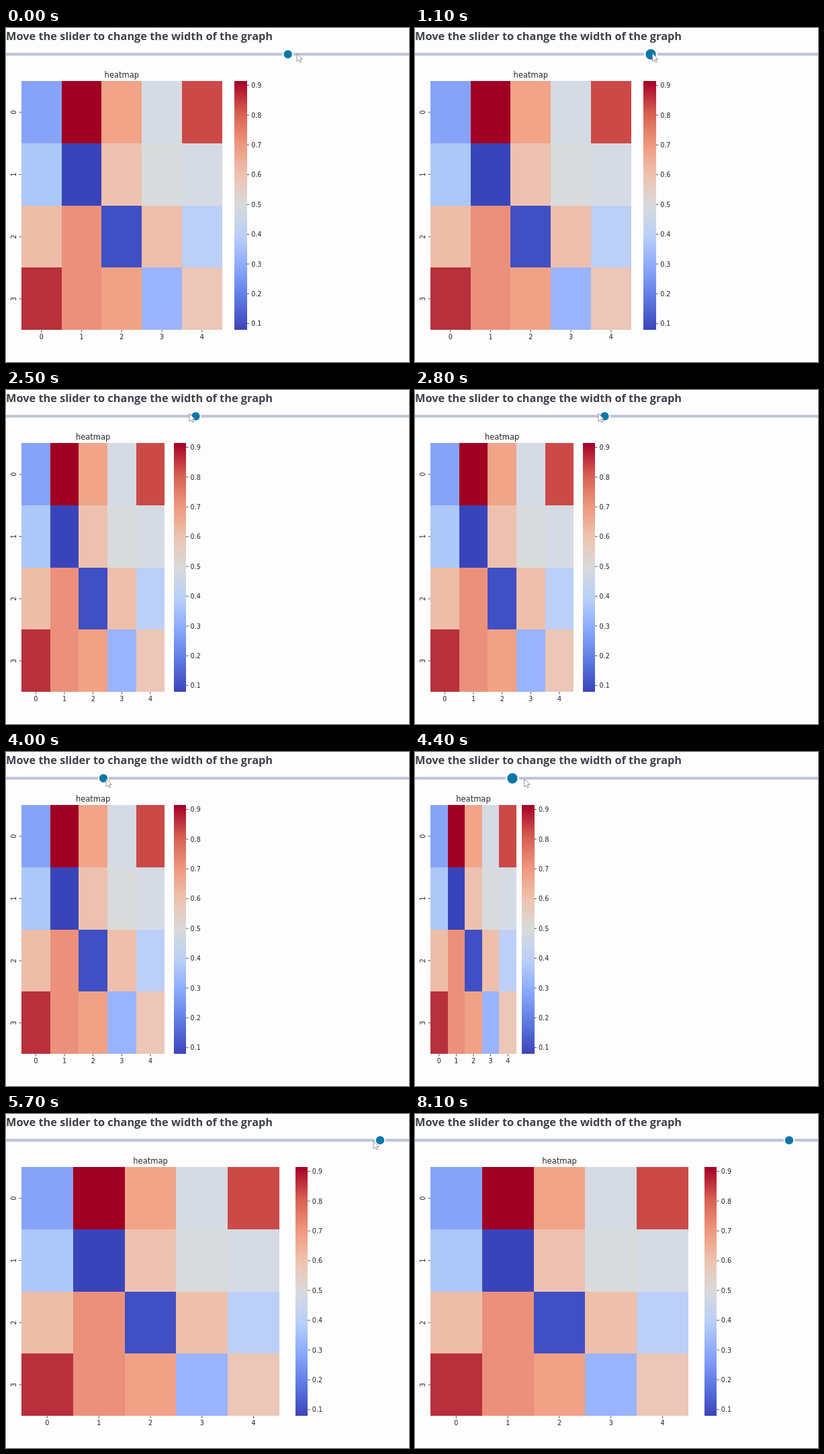
Animation of 600x498 px, one loop 8400 ms. Source, as an HTML page:

```html
<!DOCTYPE html>
<html lang="en">
<head>
<meta charset="utf-8">
<title>Heatmap width slider</title>
<style>
  html, body { margin: 0; width: 100%; height: 100%; overflow: hidden; background: #fefdfe; }
  svg { display: block; width: 600px; height: 498px; }
  .heading { font: 700 16.35px "Open Sans", "Noto Sans", sans-serif; fill: #3d4049; }
  .plot text { font: 9.6px "DejaVu Sans", sans-serif; fill: #262626; }
  .plot .title { font-size: 11.5px; }
  .mid { text-anchor: middle; }
  .plot line { stroke: #262626; stroke-width: .8; }
  .plot rect { shape-rendering: crispEdges; }
</style>
</head>
<body>
<svg viewBox="0 0 600 498">
  <defs><linearGradient id="scale" x1="0" y1="1" x2="0" y2="0"></linearGradient></defs>
  <rect width="600" height="498" fill="#fefdfe"/>
  <text class="heading" x="0" y="18">Move the slider to change the width of the graph</text>
  <rect x="-1" y="37" width="605" height="4.2" rx="2" fill="#bfc5d9"/>
  <circle id="thumb" cy="39.2" fill="#0b77a8" stroke="#fefdfe"/>
  <g id="plot" class="plot"></g>
  <path id="cursor" d="M0 0V12L2.8 9.4L4.7 13.4L6.6 12.6L4.8 8.7H8.4Z" fill="#fff" stroke="#85858f" stroke-width=".9"/>
</svg>
<script>
const LOOP = 8400, STEP = 100;
const LEFT = 23, TOP = 79.3, BOTTOM = 450.2;
const CELL_H = (BOTTOM - TOP) / 4;
const CELLS = [
  ["#87a3f8", "#a10023", "#f1a488", "#d5dbe5", "#cb4a47"],
  ["#abc8f8", "#3a44ba", "#edc1b0", "#d8dbdb", "#d6dae4"],
  ["#eebda8", "#eb917b", "#404fc4", "#eebfaa", "#bccff6"],
  ["#b8303c", "#eb907b", "#f1a286", "#9ab3fd", "#ecc6b6"]
];
const SCALE = ["#3c44ba", "#5d78e2", "#8aa8fb", "#b8cff8", "#d8dadb",
               "#eec2ae", "#ee967c", "#d65d50", "#a50026"];

// [time, x, y] of the pointer tip
const POINTER = [
  [0, 433, 38], [100, 436, 38], [200, 435, 38], [600, 421, 37],
  [800, 421, 37], [1200, 341, 38], [1900, 341, 38], [2300, 273, 35],
  [2800, 273, 35], [3300, 277, 38], [3900, 149, 40],
  [4300, 149, 40], [5200, 547, 40], [LOOP, 547, 40]
];
const POINTER_GONE = 6000;
const PRESSED = [[600, 1500], [2000, 2500], [3400, 4000], [4400, 5700]];
// [time, plot width in units]
const WIDTHS = [[0, 7], [1500, 6], [2500, 5], [4100, 3], [5700, 9]];

const byId = id => document.getElementById(id);

function add(parent, tag, attrs, text) {
  const el = document.createElementNS("http://www.w3.org/2000/svg", tag);
  for (const k in attrs) el.setAttribute(k, attrs[k]);
  if (text !== undefined) el.textContent = text;
  parent.appendChild(el);
  return el;
}

function set(el, attrs) {
  for (const k in attrs) el.setAttribute(k, attrs[k]);
}

SCALE.forEach((color, i) =>
  add(byId("scale"), "stop", { offset: i / (SCALE.length - 1), "stop-color": color }));

const plot = byId("plot");
const title = add(plot, "text", { class: "title mid", y: 73.6 }, "heatmap");

const cells = CELLS.map((row, r) => {
  const y = TOP + CELL_H * (r + .5);
  add(plot, "line", { x1: 19.6, x2: LEFT, y1: y, y2: y });
  add(plot, "text", { class: "mid", transform: `translate(14.7 ${y}) rotate(-90)` }, r);
  return row.map(fill => add(plot, "rect", { y: TOP + CELL_H * r, height: CELL_H, fill }));
});

const columns = CELLS[0].map((_, c) => {
  const g = add(plot, "g", {});
  add(g, "line", { x1: 0, x2: 0, y1: BOTTOM, y2: BOTTOM + 3.4 });
  add(g, "text", { class: "mid", y: 464.4 }, c);
  return g;
});

const bar = add(plot, "g", {});
add(bar, "rect", { y: TOP, width: 18.5, height: BOTTOM - TOP, fill: "url(#scale)" });
for (let i = 1; i <= 9; i++) {
  const y = 440.7 - 44.4 * (i - 1);
  add(bar, "line", { x1: 18.5, x2: 21.9, y1: y, y2: y });
  add(bar, "text", { x: 25, y: y + 3.6 }, (i / 10).toFixed(1));
}

let shown = 0;
function layout(units) {
  if (units === shown) return;
  shown = units;
  const width = 42.67 * units, cell = width / 5;
  cells.forEach(row => row.forEach((el, c) => set(el, { x: LEFT + cell * c, width: cell })));
  columns.forEach((g, c) => set(g, { transform: `translate(${LEFT + cell * (c + .5)} 0)` }));
  set(title, { x: LEFT + width / 2 });
  set(bar, { transform: `translate(${159 + 45.3 * (units - 3)} 0)` });
}

function pointerAt(t) {
  const i = POINTER.findIndex(key => key[0] > t);
  const [t0, x0, y0] = POINTER[i - 1], [t1, x1, y1] = POINTER[i];
  const p = (t - t0) / (t1 - t0);
  const k = p * p * (3 - 2 * p);
  return [x0 + (x1 - x0) * k, y0 + (y1 - y0) * k];
}

function draw(now) {
  const t = Math.floor(now % LOOP / STEP) * STEP;
  const [x, y] = pointerAt(t);
  const pressed = PRESSED.some(([a, b]) => t >= a && t < b);
  const notch = Math.round((x - 145) / 68.67);
  set(byId("thumb"), {
    cx: 145 + 68.67 * notch,
    r: pressed ? 9 : 7.2,
    "stroke-width": pressed ? 2.6 : 2
  });
  set(byId("cursor"), {
    transform: `translate(${x} ${y})`,
    visibility: t < POINTER_GONE ? "visible" : "hidden"
  });
  layout(WIDTHS.filter(key => key[0] <= t).pop()[1]);
}

const start = performance.now();
function tick() {
  draw(performance.now() - start);
  requestAnimationFrame(tick);
}
tick();
</script>
</body>
</html>
```
